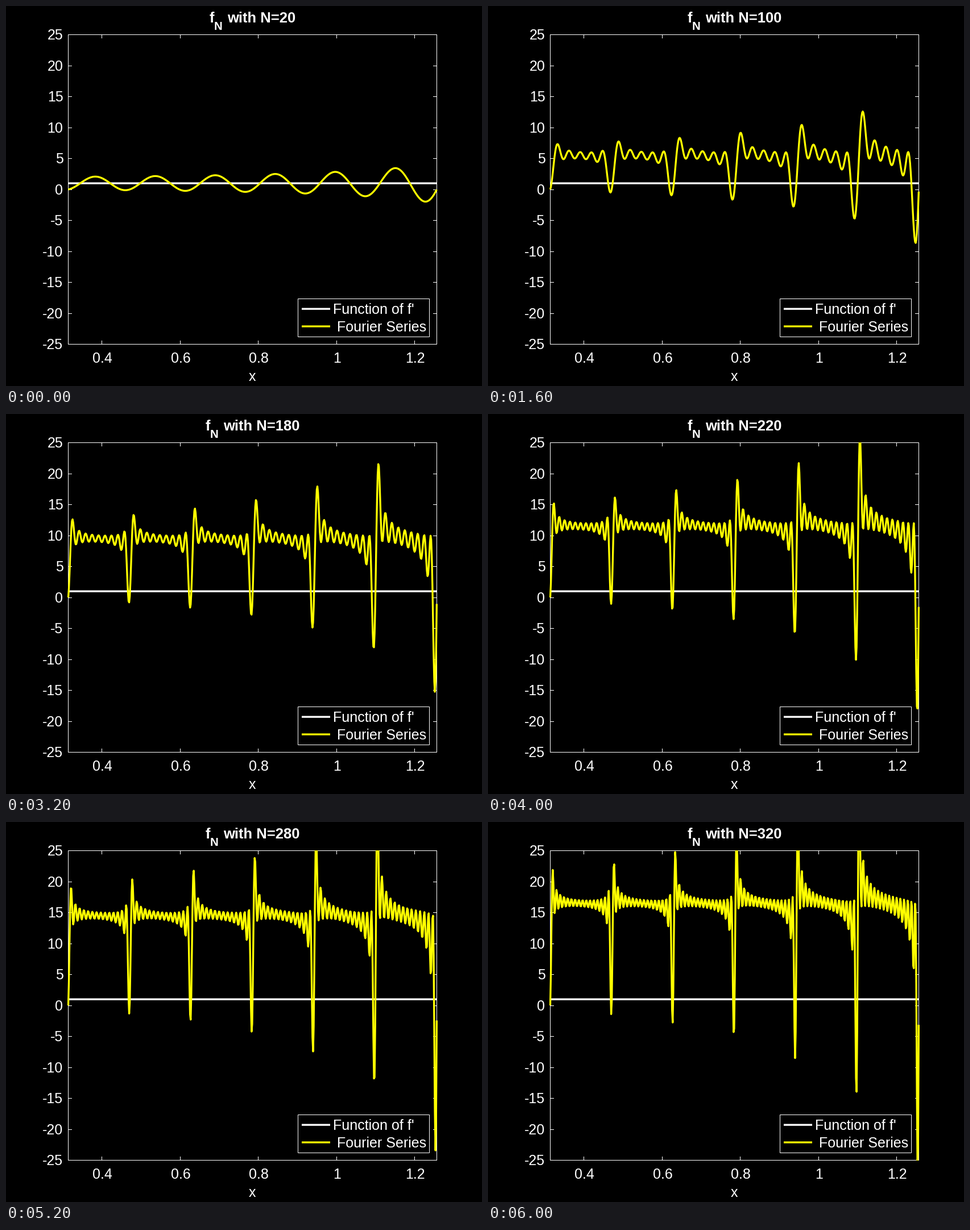
A matplotlib script for the animation above (6400 ms loop, 837x669 px).

```python
import numpy as np
import matplotlib
import matplotlib.pyplot as plt
from matplotlib.animation import FuncAnimation
from matplotlib.patches import Rectangle

matplotlib.rcParams["font.family"] = "Liberation Sans"
matplotlib.rcParams["path.simplify"] = False
matplotlib.rcParams["toolbar"] = "None"

W, H, DPI = 837, 669, 64
PT = 72 / DPI                       # points per pixel
LEFT, RIGHT, TOP, BOTTOM = 109.5, 757.5, 50.5, 595.5
X0, X1 = np.pi / 10, 2 * np.pi / 5
Y0, Y1 = -25, 25
STEP, FRAMES = 20, 16
WHITE, YELLOW = "#ffffff", "#ffff00"
FONT, TITLE_FONT, LINE = 25, 25.6, 3.3

fig = plt.figure(figsize=(W / DPI, H / DPI), dpi=DPI, facecolor="black")
ax = fig.add_axes([0, 0, 1, 1])
ax.set_xlim(0, W)
ax.set_ylim(H, 0)
ax.axis("off")


def px(x):
    return LEFT + (x - X0) / (X1 - X0) * (RIGHT - LEFT)


def py(y):
    return BOTTOM - (y - Y0) / (Y1 - Y0) * (BOTTOM - TOP)


def label(x, y, text, ha="center", size=FONT, weight="normal"):
    return ax.text(x, y, text, ha=ha, va="baseline", color=WHITE,
                   fontsize=size * PT, fontweight=weight, zorder=6)


def stroke(xs, ys, color=WHITE, width=1.0, z=2):
    return ax.plot(xs, ys, color=color, lw=width * PT, zorder=z, snap=False,
                   solid_capstyle="butt", solid_joinstyle="round")[0]


def frame_box(x, y, w, h, z):
    ax.add_patch(Rectangle((x, y), w, h, fc="black", ec=WHITE, lw=PT,
                           zorder=z, snap=False))


# Axes box, ticks and labels
frame_box(LEFT, TOP, RIGHT - LEFT, BOTTOM - TOP, 1)
TICK = 6.5
for v in (0.4, 0.6, 0.8, 1, 1.2):
    x = np.floor(px(v)) + 0.5
    stroke([x, x], [BOTTOM, BOTTOM - TICK])
    stroke([x, x], [TOP, TOP + TICK])
    label(x + 0.5, 628.5, f"{v:g}")
for v in range(Y0, Y1 + 1, 5):
    y = np.floor(py(v)) + 0.5
    stroke([LEFT, LEFT + TICK], [y, y])
    stroke([RIGHT, RIGHT - TICK], [y, y])
    label(100.5, y + 8.6, str(v), ha="right")
label(433.3, 659.5, "x")

# Curves: the sums of all steps so far add up
x = np.linspace(X0, X1 - 0.00019, 600)
partial = [1 - np.cos((2 * STEP * k + 1) * x) / np.cos(x)
           for k in range(1, FRAMES + 1)]
sums = np.cumsum(partial, axis=0)

stroke([LEFT, RIGHT], [py(1), py(1)], WHITE, LINE, 3)
curve = stroke(px(x), py(sums[0]), YELLOW, LINE, 4)
curve.set_clip_path(Rectangle((LEFT - 5, TOP - 0.5), RIGHT - LEFT + 10,
                              BOTTOM - TOP + 1, transform=ax.transData))

# Legend
frame_box(513.5, 515.5, 231, 67, 5)
for y, color, text in ((533.2, WHITE, "Function of f'"),
                       (564, YELLOW, " Fourier Series")):
    stroke([520, 570], [y, y], color, LINE, 6)
    label(575.5, y + 9, text, ha="left")

# Title in three parts: letter, subscript, rest
title_f = label(0, 29, "f", "left", TITLE_FONT, "bold")
title_sub = label(0, 41.5, "N", "left", TITLE_FONT * 0.8, "bold")
title_rest = label(0, 29, "", "left", TITLE_FONT, "bold")


def draw(i):
    n = STEP * (i + 1)
    start = 358 if n < 100 else 351
    title_f.set_x(start)
    title_sub.set_x(start + 8)
    title_rest.set_x(start + 31)
    title_rest.set_text(f"with N={n}")
    curve.set_ydata(py(sums[i]))
    return curve, title_f, title_sub, title_rest


anim = FuncAnimation(fig, draw, frames=FRAMES, interval=400,
                     init_func=lambda: draw(0), repeat=True,
                     repeat_delay=0, blit=False)
plt.show()
```
